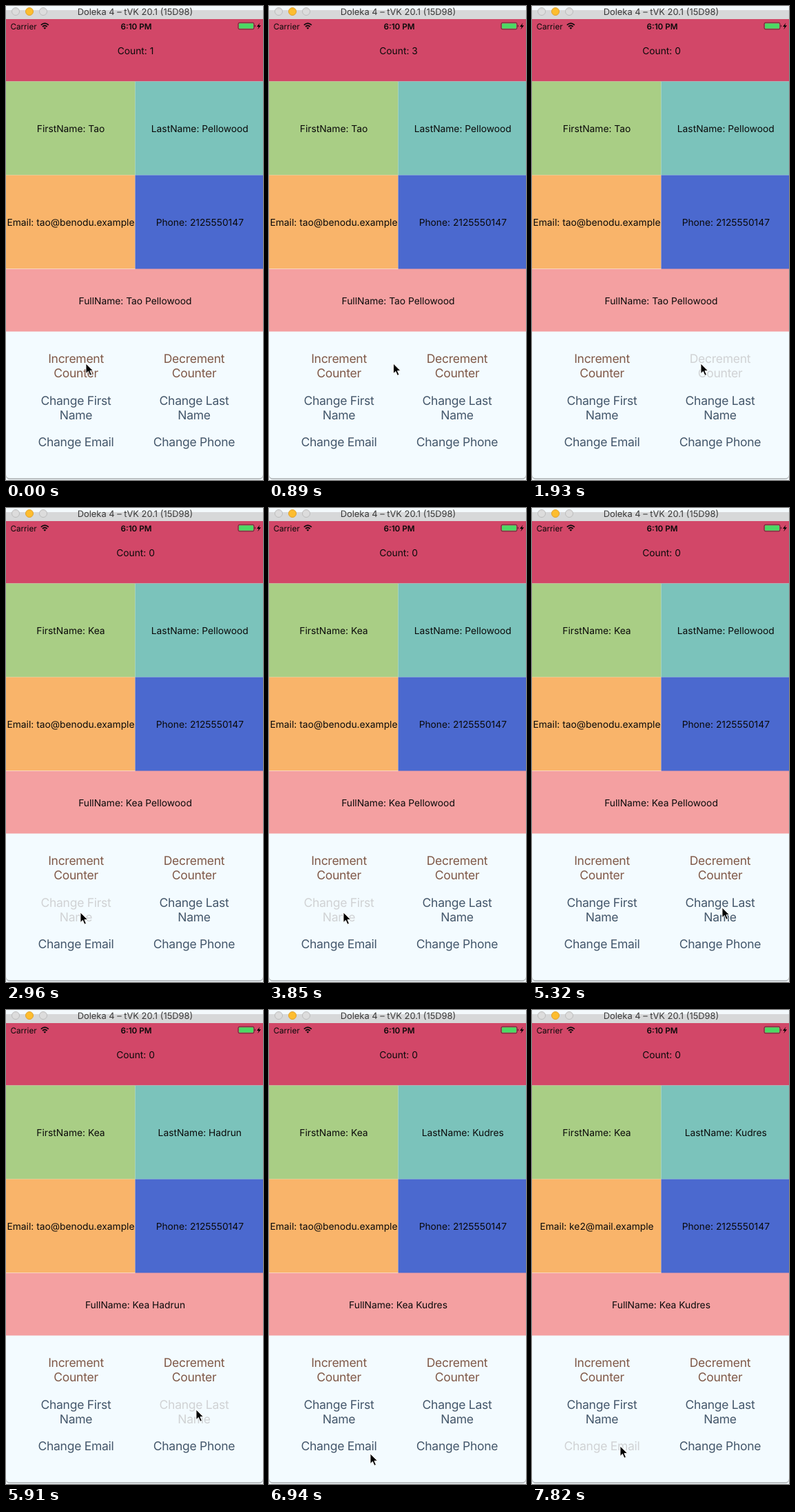
An HTML page for the animation above (8000 ms loop, 373 by 688 pixels).

```html
<!DOCTYPE html>
<html lang="en">
<head>
<meta charset="utf-8">
<title>Counter demo</title>
<style>
html, body { margin: 0; width: 100%; height: 100%; overflow: hidden; background: #f3f9fc; }
svg { display: block; width: 373px; height: 688px; }
text { font: 13.8px Inter, Roboto, sans-serif; text-anchor: middle; text-rendering: geometricPrecision; fill: #0a0a0a; }
.title { font-size: 12.9px; fill: #383838; }
.status { font-size: 11.7px; }
.bold { font-weight: 600; }
.button { font-size: 17.5px; letter-spacing: -.27px; fill: #43566a; }
.brown { fill: #7f5847; }
.pressed { fill: #d0d2d4; }
</style>
</head>
<body>
<svg viewBox="0 0 373 688">
  <!-- window frame -->
  <rect y="6" width="373" height="13" fill="#d7d8d9"/>
  <g fill="#dcdcdc" stroke="#bcbcbc">
    <circle cx="14" cy="8" r="5.5"/>
    <circle cx="34" cy="8" r="5.5" fill="#fdbd2f" stroke="#e0a02c"/>
    <circle cx="54" cy="8" r="5.5"/>
  </g>
  <text class="title" x="187.5" y="13">Doleka 4 – tVK 20.1 (15D98)</text>
  <path d="M0 470H373V681Q373 687 367 687H6Q0 687 0 681Z" fill="#a9adb0"/>
  <path d="M0 470H373V680Q373 685.5 367 685.5H6Q0 685.5 0 680Z" fill="#f3fbff"/>

  <!-- panels -->
  <rect y="19" width="373" height="90.5" fill="#d24768"/>
  <rect y="109.5" width="187.5" height="136" fill="#a9ce85"/>
  <rect x="187.5" y="109.5" width="185.5" height="136" fill="#7bc3bb"/>
  <rect y="381" width="373" height="91.5" fill="#f4a0a1"/>
  <rect y="245.5" width="187.5" height="135.5" fill="#f9b46a"/>
  <rect x="187.5" y="245.5" width="185.5" height="136" fill="#4b69cf"/>
  <rect y="381" width="187.5" height=".8" fill="#fbe3c8"/>

  <!-- status bar -->
  <text class="status" x="25.5" y="33.5">Carrier</text>
  <g fill="none" stroke="#0a0a0a" stroke-width="1.7">
    <path d="M50.8 27.6Q56.3 22.6 61.8 27.6M53 30Q56.3 27 59.6 30"/>
    <path d="M56.3 33.8L54.4 31.7Q56.3 30.3 58.2 31.7Z" fill="#0a0a0a" stroke="none"/>
  </g>
  <text class="status bold" x="189" y="33.5">6:10 PM</text>
  <rect x="337" y="24.2" width="23" height="9.6" rx="2" fill="none" stroke="#151515" stroke-width=".6"/>
  <rect x="338" y="25.2" width="21" height="7.6" rx="1" fill="#4cd964"/>
  <path d="M361 27.2Q362.8 29 361 30.8Z"/>
  <path d="M368.5 24.5L364 30H366.8L365.3 34L370 28.3H367Z"/>

  <g id="labels"></g>
  <g id="buttons"></g>
  <path id="cursor" d="M0 0V14.5L3.4 11.4L5.9 17.3L8.4 16.2L5.9 10.6H10.5Z" fill="#000" stroke="#fff" stroke-width=".9"/>
</svg>
<script>
const LOOP = 8000, STEP = 147.5;
const byId = id => document.getElementById(id);

function addText(parent, x, y, className, content = '') {
  const node = document.createElementNS('http://www.w3.org/2000/svg', 'text');
  node.setAttribute('x', x);
  node.setAttribute('y', y);
  node.setAttribute('class', className);
  node.textContent = content;
  byId(parent).append(node);
  return node;
}

const label = (x, y) => addText('labels', x, y, 'label');
const labels = {
  count: label(188, 69.5),
  first: label(94, 182.5),
  last: label(281.3, 182.5),
  email: label(94, 318.5),
  phone: label(281.3, 318.5),
  full: label(187.5, 432.5)
};

function button(x, y, className, ...lines) {
  return lines.map((line, i) => addText('buttons', x, y + i * 21, 'button ' + className, line));
}
const buttons = {
  inc: button(101.5, 518, 'brown', 'Increment', 'Counter'),
  dec: button(273, 518, 'brown', 'Decrement', 'Counter'),
  first: button(101.5, 579, '', 'Change First', 'Name'),
  last: button(273, 579, '', 'Change Last', 'Name'),
  email: button(101.5, 639, '', 'Change Email'),
  phone: button(273, 639, '', 'Change Phone')
};

const initial = { count: 1, first: 'Tao', last: 'Pellowood', email: 'tao@benodu.example' };

// [step, field, value]
const changes = [
  [1, 'count', 2], [4, 'count', 3], [7, 'count', 2], [10, 'count', 1], [13, 'count', 0],
  [20, 'first', 'Kea'], [23, 'first', 'Luca'], [26, 'first', 'Kea'],
  [29, 'first', 'Luca'], [32, 'first', 'Kea'],
  [37, 'last', 'Kudres'], [40, 'last', 'Hadrun'], [45, 'last', 'Kudres'],
  [49, 'email', 'ke1@mail.example'], [53, 'email', 'ke2@mail.example']
];

// Steps at which each button is held down
const presses = {
  inc: [1, 4], dec: [7, 10, 13], first: [20, 23, 26, 29, 32],
  last: [37, 40, 45], email: [49, 52, 53, 54], phone: []
};

// [step, x, y]
const path = [
  [0, 116, 519], [5, 116, 519], [7, 245, 519], [14, 245, 519], [17, 150, 600],
  [19, 108, 587], [33, 108, 587], [36, 276, 580], [45, 276, 580],
  [47, 147, 644], [49, 128, 633], [55, 128, 633]
];

function cursorAt(step) {
  const i = path.findIndex(key => key[0] > step);
  const [s0, x0, y0] = path[i - 1], [s1, x1, y1] = path[i];
  const u = (step - s0) / (s1 - s0), ease = u * u * (3 - 2 * u);
  return [x0 + (x1 - x0) * ease, y0 + (y1 - y0) * ease];
}

function render(step) {
  const state = { ...initial };
  for (const [at, field, value] of changes) if (at <= step) state[field] = value;
  labels.count.textContent = 'Count: ' + state.count;
  labels.first.textContent = 'FirstName: ' + state.first;
  labels.last.textContent = 'LastName: ' + state.last;
  labels.email.textContent = 'Email: ' + state.email;
  labels.phone.textContent = 'Phone: 2125550147';
  labels.full.textContent = `FullName: ${state.first} ${state.last}`;
  for (const name in buttons)
    for (const line of buttons[name]) line.classList.toggle('pressed', presses[name].includes(step));
  byId('cursor').setAttribute('transform', `translate(${cursorAt(step)})`);
}

const start = performance.now();
function tick() {
  render(Math.floor((performance.now() - start) % LOOP / STEP));
  requestAnimationFrame(tick);
}
tick();
</script>
</body>
</html>
```
